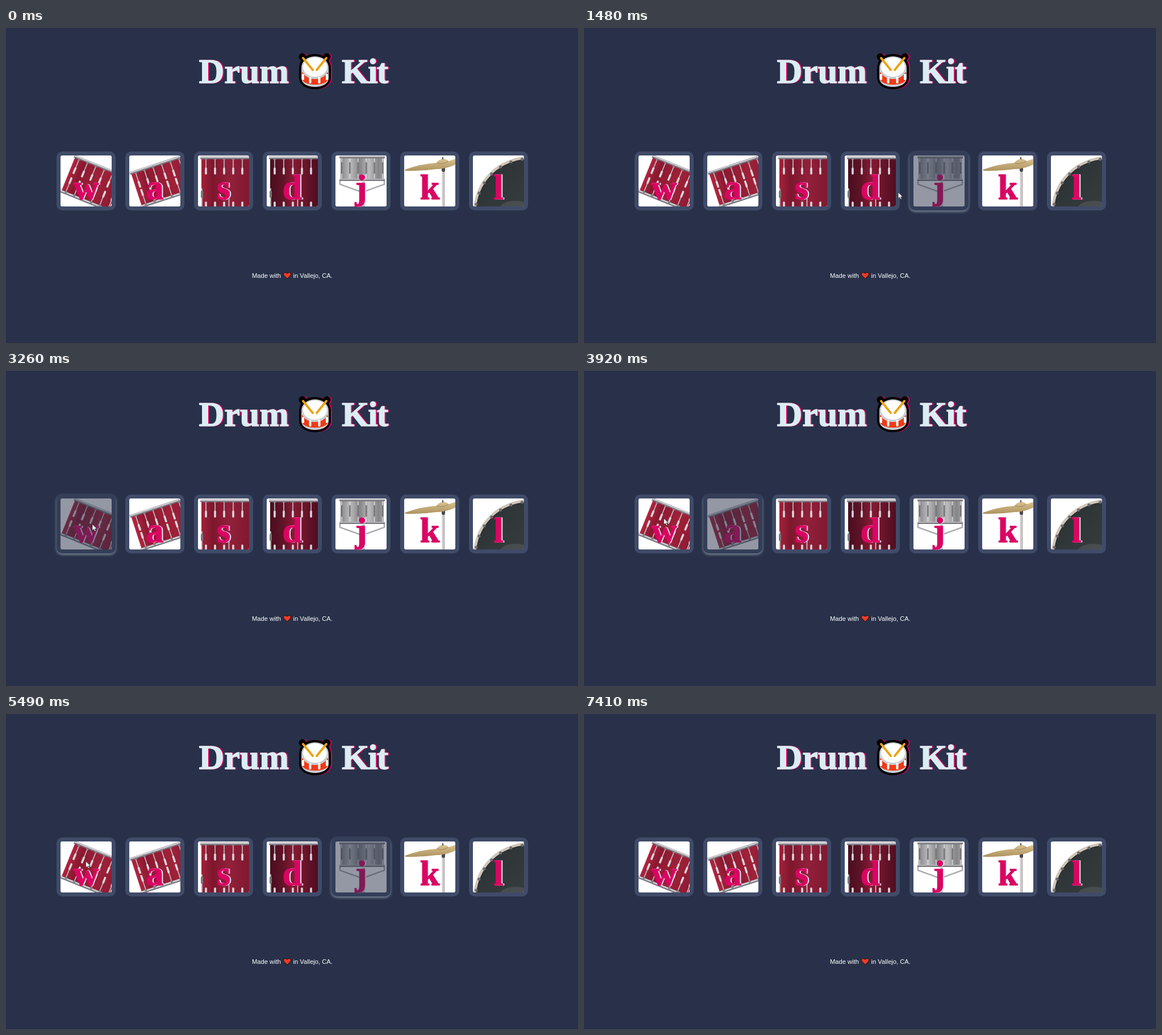
Recreate the animation shown at these times as an HTML page. Size 1007 px wide and 556 px high, loop 7.71 s.

```html
<!DOCTYPE html>
<html lang="en">
<head>
<meta charset="utf-8">
<title>Drum Kit</title>
<style>
  html, body { margin: 0; height: 100%; overflow: hidden; background: #283149; }
  svg { display: block; }
  .slab {
    font: bold 62px "Liberation Serif", serif;
    stroke-width: 1.4; stroke-linejoin: round;
  }
  .title { fill: #dbedf3; stroke: #dbedf3; }
  .pink { filter: drop-shadow(2px 0 0 #da0463); }
  .key { fill: #da0463; stroke: #da0463; text-anchor: middle; filter: drop-shadow(2px 0 0 #dbedf3); }
  .note { font: 11.2px "Liberation Sans", Arial, sans-serif; fill: #fff; }
  .pressed { opacity: .5; }
  .pressed .frame { filter: drop-shadow(0 2px 2.7px #dbedf3); }
</style>
</head>
<body>
<svg id="stage" width="1007" height="556" viewBox="0 0 1007 556">
  <defs>
    <linearGradient id="red">
      <stop offset="0" stop-color="#b12540"/><stop offset=".2" stop-color="#8a1930"/>
      <stop offset=".6" stop-color="#a02138"/><stop offset="1" stop-color="#8d1b33"/>
    </linearGradient>
    <linearGradient id="floor">
      <stop offset="0" stop-color="#a4213a"/><stop offset=".22" stop-color="#7d172d"/>
      <stop offset=".55" stop-color="#92203a"/><stop offset="1" stop-color="#7c182e"/>
    </linearGradient>
    <linearGradient id="dark">
      <stop offset="0" stop-color="#4a0e20"/><stop offset=".25" stop-color="#601327"/>
      <stop offset=".45" stop-color="#861b33"/><stop offset="1" stop-color="#460c1e"/>
    </linearGradient>
    <linearGradient id="steel" x2=".22" spreadMethod="reflect">
      <stop offset="0" stop-color="#858588"/><stop offset="1" stop-color="#bcbcbe"/>
    </linearGradient>
    <linearGradient id="brass" x2="0" y2="1">
      <stop offset="0" stop-color="#d9c191"/><stop offset="1" stop-color="#ad935f"/>
    </linearGradient>
    <linearGradient id="skin" x2="1" y2="1">
      <stop offset="0" stop-color="#2b3133"/><stop offset="1" stop-color="#434a4b"/>
    </linearGradient>
    <clipPath id="round"><rect width="90" height="90" rx="3"/></clipPath>
  </defs>

  <g class="pink">
    <text class="slab title" x="339.5" y="97">Drum</text>
    <text class="slab title" x="591" y="97" letter-spacing="-2">Kit</text>
  </g>

  <g class="pink" stroke-linecap="round">
    <circle cx="522" cy="51" r="6.5"/><circle cx="565" cy="51" r="6.5"/>
    <path d="M516 72C516 54 528 46 544 46S572 54 572 72V87C572 101 559 108 544 108S516 101 516 87Z"/>
    <path d="M520 72V88C520 99 532 104 544 104S568 99 568 88V72Z" fill="#c9cdd0"/>
    <path d="M521 78V91C526 103 562 103 567 91V78Z" fill="#f03a17"/>
    <ellipse cx="544" cy="70" rx="24" ry="20" fill="#c9cdd0"/>
    <ellipse cx="544" cy="69" rx="21" ry="17" fill="#fff"/>
    <path d="M523 83V90M535.500 88V96M551.500 88V96M565 83V90" stroke="#fff" stroke-width="4"/>
    <path d="M523 53L540 74M564 53L547 74" stroke="#eca312" stroke-width="4"/>
  </g>

  <g id="kit"></g>

  <text class="note" x="433" y="441">Made with</text>
  <path d="M495 442.500L489.500 437C486.500 433 491.500 429.500 495 433.500C498.500 429.500 503.500 433 500.500 437Z"
        fill="#f03a27" stroke="#111" stroke-width="1"/>
  <text class="note" x="505.500" y="441">in Vallejo, CA.</text>

  <path id="pointer" d="M0 0V11L2.600 8.700L4.400 12.600L6.200 11.800L4.500 8H8Z"
        fill="#fff" stroke="#111" stroke-width=".6"/>
</svg>

<script>
const line = (d, color, width, cap = 'butt') =>
  `<path d="${d}" fill="none" stroke="${color}" stroke-width="${width}" stroke-linecap="${cap}"/>`;

// Tension rod and lug hanging from a hoop; dir is 1 down, -1 up.
const lug = (x, y, dir) =>
  line(`M${x} ${y}v${16 * dir}`, '#c4c2c8', 1.6) +
  line(`M${x} ${y + 17 * dir}v${9 * dir}`, '#d9d7dc', 3.6, 'round') +
  `<circle cx="${x}" cy="${y}" r="2.300" fill="#85828a"/>`;

function drum(w, h, fill, transform) {
  let s = `<rect width="${w}" height="${h}" fill="url(#${fill})"/>`;
  for (const y of [0, h]) {
    s += line(`M-2 ${y}H${w + 2}`, '#77747c', 5) + line(`M-2 ${y - 1}H${w + 2}`, '#d2d0d4', 2.4);
  }
  for (let x = 8; x < w; x += 16) s += lug(x, 2, 1) + lug(x, h - 2, -1);
  return `<g transform="${transform}">${s}</g>`;
}

const floorTom = fill => drum(90, 107, fill, 'translate(6 4)') +
  line('M7 58V90', '#a9a7ad', 2) + line('M7 64v9', '#77747c', 4, 'round') +
  line('M54.500 74V90', '#d5d2d7', 1.6);

function snare() {
  let s = '<rect x="9" y="3" width="76" height="40" fill="url(#steel)"/>';
  for (let x = 11; x < 88; x += 14.4) {
    s += line(`M${x} 3V43`, '#d4d4d6', 1.6) + line(`M${x} 13v18`, '#77777c', 2.6, 'round');
  }
  return s + line('M7 3H87M7 43H87', '#77777c', 4) + line('M7 2H87M7 42H87', '#c9c9cc', 1.6) +
    line('M8 45V51L47 65L86 51V45', '#aaa9ae', 2.4) +
    line('M49 46V90', '#aaa9ae', 5) + line('M48 46V90', '#deddE0', 1.6);
}

const cymbal = () =>
  line('M69 25V90', '#b1aaae', 4.5) + line('M68.500 27V90', '#e0dadd', 1.8) +
  line('M69 22v4', '#4b464b', 6, 'round') +
  '<path d="M1 25Q32 14 57 13Q61 6 70 6Q76 7 78 10L90 6V16Q74 24 57 24Q30 28 2 27Z" fill="url(#brass)"/>' +
  line('M57 13Q67 17 78 10', '#927b4c', .8) + line('M68 7V3', '#555', 2);

function bass() {
  let s = '<circle cx="98" cy="99" r="97" fill="#cfc5b7"/><circle cx="98" cy="99" r="91.500" fill="url(#skin)"/>' +
    '<circle cx="98" cy="99" r="91.500" fill="none" stroke="#25292b" stroke-width="1.500"/>' +
    '<ellipse cx="75" cy="94" rx="28" ry="14" fill="#505557" opacity=".7"/>';
  for (let i = 0; i < 7; i++) {
    const a = (188 + i * 12.5) * Math.PI / 180;
    s += `<circle cx="${98 + 93 * Math.cos(a)}" cy="${99 + 93 * Math.sin(a)}" r="2.600" fill="#6d6b70"/>`;
  }
  return s;
}

const pads = [
  ['w', drum(90, 66, 'red', 'translate(26 2) rotate(22)')],
  ['a', drum(110, 62, 'red', 'translate(3 31) rotate(-18)')],
  ['s', floorTom('floor')],
  ['d', floorTom('dark')],
  ['j', snare()],
  ['k', cymbal()],
  ['l', bass()]
];

const kit = document.getElementById('kit');
kit.innerHTML = pads.map(([letter, art], i) => `
  <g transform="translate(${89 + 121 * i} 218)">
    <rect class="frame" width="104" height="104" rx="10" fill="#404b69"/>
    <g transform="translate(7 7)" clip-path="url(#round)">
      <rect width="90" height="90" fill="#fff"/>${art}
    </g>
    <text class="slab key" x="52" y="84">${letter}</text>
  </g>`).join('');

const LOOP = 7710;

// [pad, start, length]
const hits = [
  [6, 620], [5, 1120], [4, 1410], [3, 1620], [2, 2000], [1, 2760], [0, 3260],
  [0, 3750], [1, 3920, 80], [2, 4090], [3, 4270], [4, 5490], [5, 5680], [6, 5860]
];

// [time, x, y] of the pointer tip
const path = [
  [260, 965, 539], [420, 920, 410], [560, 882, 308], [700, 862, 288], [1010, 750, 287],
  [1120, 750, 287], [1300, 680, 289], [1480, 553.5, 290], [1620, 502, 292], [1870, 412, 295],
  [2210, 393.5, 294], [2410, 393.5, 294], [2700, 277, 282], [2850, 250, 279], [3140, 152, 270.5],
  [3520, 152, 270.5], [3580, 140.5, 260], [6600, 140.5, 260], [6750, 180, 230], [6860, 230, 214],
  [7050, 430, 265], [7220, 735, 420], [7350, 965, 543], [7410, 975, 556]
];

const pointer = document.getElementById('pointer');

function draw(t) {
  [...kit.children].forEach((pad, i) => {
    const down = hits.some(([n, at, len = 100]) => n === i && t >= at && t < at + len);
    pad.classList.toggle('pressed', down);
  });

  const next = path.findIndex(p => p[0] > t);
  pointer.style.display = next > 0 ? '' : 'none';
  if (next > 0) {
    const [t0, x0, y0] = path[next - 1], [t1, x1, y1] = path[next];
    const k = (t - t0) / (t1 - t0);
    pointer.setAttribute('transform', `translate(${x0 + (x1 - x0) * k} ${y0 + (y1 - y0) * k})`);
  }
}

const start = performance.now();
function tick() {
  draw((performance.now() - start) % LOOP);
  requestAnimationFrame(tick);
}
tick();
</script>
</body>
</html>
```
